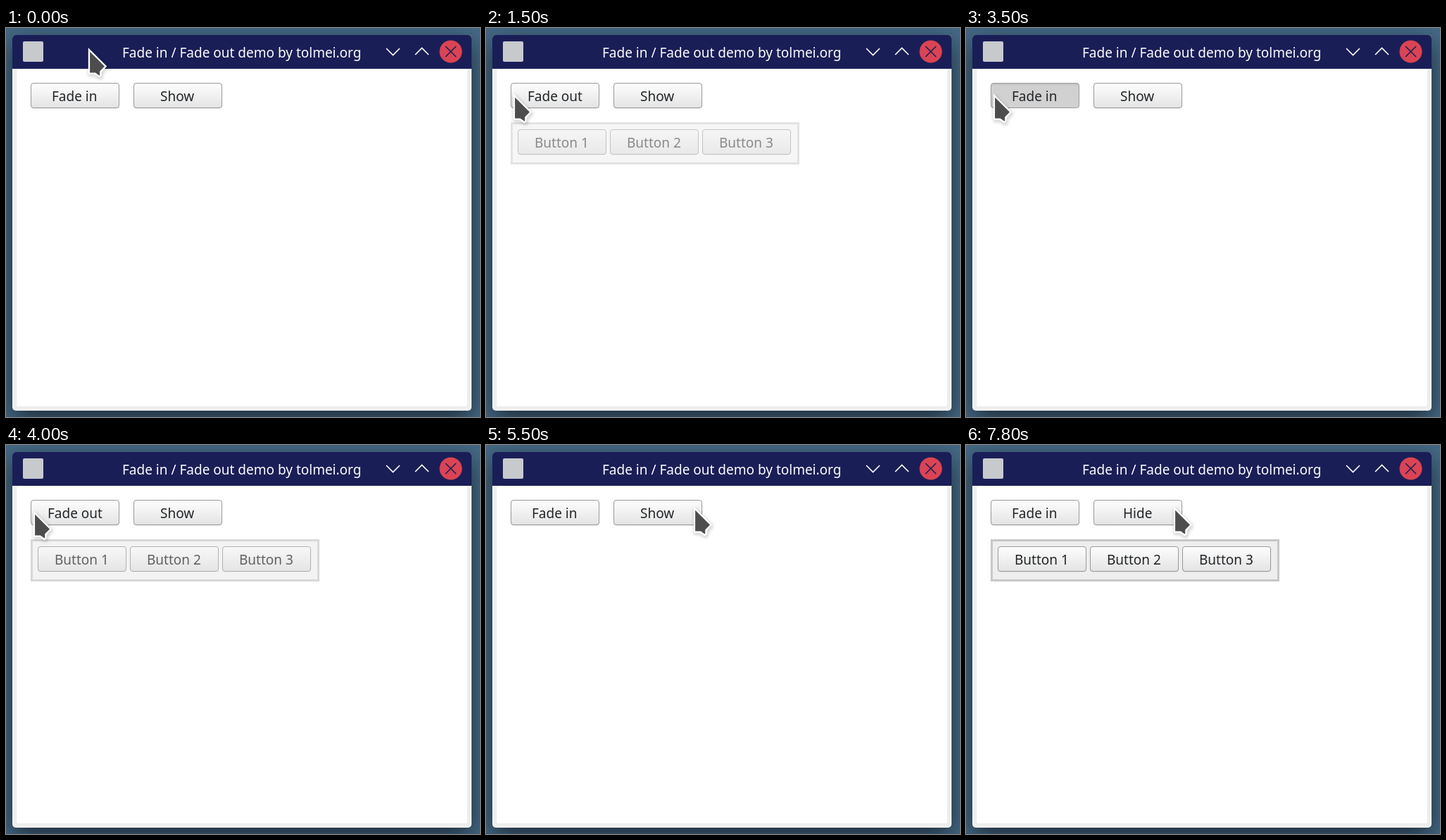
An HTML page with a canvas for the animation above (8 s loop, 673 px wide and 553 px high).

```html
<!DOCTYPE html>
<html lang="en">
<head>
<meta charset="utf-8">
<title>Fade demo</title>
<style>
  html, body { margin: 0; width: 100%; height: 100%; overflow: hidden; background: #456986; }
  canvas { display: block; }
</style>
</head>
<body>
<canvas id="stage" width="673" height="553"></canvas>
<script>
const ctx = document.getElementById("stage").getContext("2d");
const LOOP = 8000, STEP = 100, FADE = 500;
const NAVY = "#1a1e57", INK = "#232629";

const clamp = v => Math.min(1, Math.max(0, v));
const within = (t, from, to) => t >= from && t < to;

function roundRect(x, y, w, h, r) {
  ctx.beginPath();
  ctx.roundRect(x, y, w, h, r);
}

function line(points, color, width) {
  ctx.beginPath();
  points.forEach(([x, y]) => ctx.lineTo(x, y));
  ctx.strokeStyle = color;
  ctx.lineWidth = width;
  ctx.stroke();
}

function text(str, x, y, color) {
  ctx.font = '19px "Noto Sans", sans-serif';
  ctx.fillStyle = color;
  ctx.fillText(str, x, y);
}

function drawWindow() {
  ctx.fillStyle = "#456986";
  ctx.fillRect(0, 0, 673, 553);

  ctx.save();
  ctx.shadowColor = "rgba(0,0,0,.6)";
  ctx.shadowBlur = 36;
  ctx.shadowOffsetY = 12;
  ctx.fillStyle = "#efefef";
  roundRect(9, 10, 652, 534, 5);
  ctx.fill();
  ctx.restore();

  ctx.fillStyle = NAVY;
  roundRect(9, 10, 652, 48, [5, 5, 0, 0]);
  ctx.fill();
  ctx.fillStyle = "#e8e8e8";
  ctx.fillRect(14, 58, 642, 481);
  ctx.fillStyle = "#fff";
  ctx.fillRect(15, 58, 640, 480);

  // Plain app icon
  ctx.fillStyle = "#c6cacd";
  roundRect(24, 19, 29, 29, 2);
  ctx.fill();

  text("Fade in / Fade out demo by tolmei.org", 165, 42, "#fcfcfc");
  line([[540, 29], [549.5, 38.5], [559, 29]], "#fcfcfc", 1.6);
  line([[581, 38], [590.5, 28.5], [600, 38]], "#fcfcfc", 1.6);

  ctx.fillStyle = "#da4453";
  ctx.beginPath();
  ctx.arc(631.5, 33.5, 16, 0, Math.PI * 2);
  ctx.fill();
  line([[624, 26], [639, 41]], NAVY, 1.6);
  line([[639, 26], [624, 41]], NAVY, 1.6);
}

function button(x, y, label, pressed = false) {
  const w = 126, h = 36;
  if (!pressed) {
    ctx.fillStyle = "rgba(0,0,0,.063)";
    roundRect(x, y, w, h + 1, 4);
    ctx.fill();
  }
  const fill = ctx.createLinearGradient(0, y, 0, y + h);
  if (pressed) {
    fill.addColorStop(0, "#bababa");
    fill.addColorStop(0.12, "#d0d0d0");
    fill.addColorStop(1, "#d2d2d2");
  } else {
    fill.addColorStop(0, "#fefefe");
    fill.addColorStop(1, "#e3e3e3");
  }
  roundRect(x + 0.5, y + 0.5, w - 1, h - 1, 3.5);
  ctx.fillStyle = fill;
  ctx.fill();
  ctx.strokeStyle = "#999";
  ctx.lineWidth = 1;
  ctx.stroke();

  ctx.font = '19px "Noto Sans", sans-serif';
  text(label, Math.floor(x + (w - ctx.measureText(label).width) / 2), y + 26, INK);
}

function panel(opacity) {
  if (opacity <= 0) return;
  ctx.globalAlpha = opacity;
  ctx.fillStyle = "#eee";
  ctx.fillRect(38, 137, 404, 54);
  ctx.strokeStyle = "#c8c8c8";
  ctx.lineWidth = 3;
  ctx.strokeRect(36.5, 135.5, 407, 57);
  [1, 2, 3].forEach(n => button(45 + 131 * (n - 1), 144, "Button " + n));
  ctx.globalAlpha = 1;
}

function cursor([x, y]) {
  const shape = [[0, 0], [23.5, 23.5], [16.3, 31], [16.3, 36.5], [14.5, 38], [8.5, 33.5], [0, 33.5]];
  ctx.save();
  ctx.translate(x, y);
  ctx.beginPath();
  shape.forEach(p => ctx.lineTo(...p));
  ctx.closePath();
  ctx.lineWidth = 2.2;
  ctx.strokeStyle = "#fff";
  ctx.shadowColor = "rgba(0,0,0,.4)";
  ctx.shadowBlur = 5;
  ctx.shadowOffsetX = 1;
  ctx.shadowOffsetY = 2;
  ctx.stroke();
  ctx.shadowColor = "transparent";
  ctx.fillStyle = "#4d4d4d";
  ctx.fill();
  ctx.stroke();
  ctx.restore();
}

// Clicks on the fade button: release times alternate fade in / fade out.
const fades = [1250, 2400, 3650, 4850];

function fadeOpacity(t) {
  return fades.reduce((sum, start, i) =>
    sum + (i % 2 ? -1 : 1) * clamp((t - start) / FADE), 0);
}

function cursorAt(t) {
  const spots = [[118, 31], [40, 96], [296, 90]];
  const glide = (start, end) => {
    const p = clamp((t - start) / (end - start));
    return p * p * (3 - 2 * p);
  };
  const a = glide(200, 800), b = glide(5100, 5500);
  return [0, 1].map(i =>
    spots[0][i] + (spots[1][i] - spots[0][i]) * a + (spots[2][i] - spots[1][i]) * b);
}

function draw(t) {
  const fadedIn = within(t, 1300, 2500) || within(t, 3700, 4900);
  const fadePressed = within(t, 1200, 1300) || within(t, 2400, 2500) ||
    within(t, 3500, 3700) || within(t, 4800, 4900);
  const shown = within(t, 6200, 7100) || t >= 7800;
  const showPressed = within(t, 6100, 6200) || within(t, 7000, 7100) || within(t, 7700, 7800);

  drawWindow();
  button(35, 78, fadedIn ? "Fade out" : "Fade in", fadePressed);
  button(181, 78, shown ? "Hide" : "Show", showPressed);
  panel(shown ? 1 : fadeOpacity(t));
  cursor(cursorAt(t));
}

const begin = performance.now();
function tick() {
  const t = (performance.now() - begin) % LOOP;
  draw(Math.floor(t / STEP) * STEP);
  requestAnimationFrame(tick);
}
tick();
</script>
</body>
</html>
```
